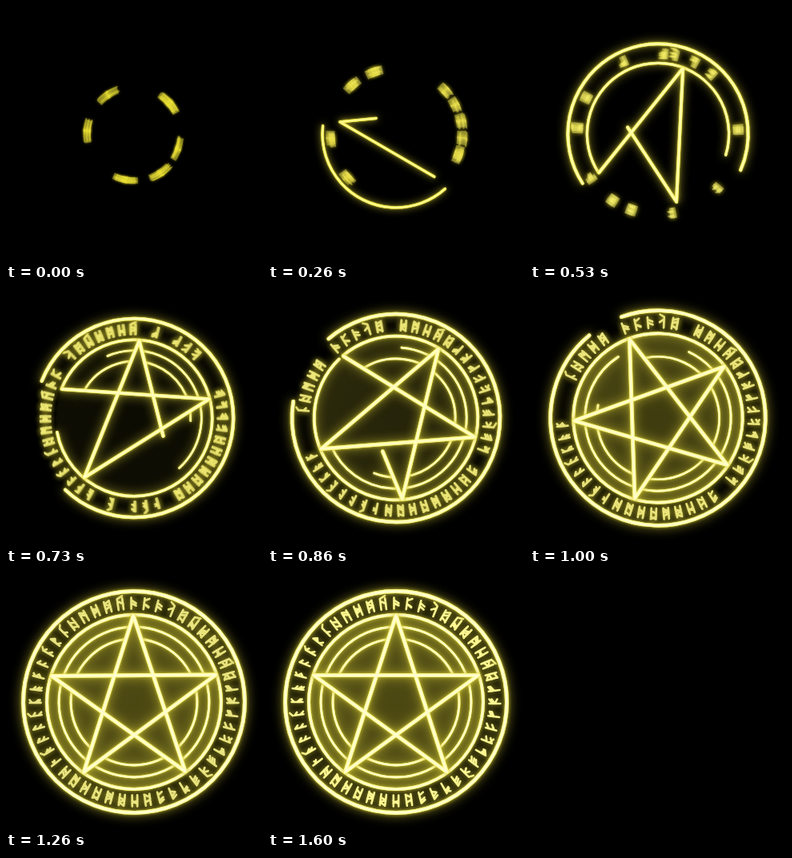
An HTML page with a canvas for the animation above (1.66 s loop, 320x320 px).

```html
<!DOCTYPE html>
<html>
<head>
<meta charset="utf-8">
<style>
html, body { margin: 0; width: 100%; height: 100%; overflow: hidden; background: #000; }
canvas { display: block; }
</style>
</head>
<body>
<canvas id="stage" width="320" height="320"></canvas>
<script>
const ctx = document.getElementById('stage').getContext('2d');
const LOOP = 1660, STEP = 1000 / 15, TAU = Math.PI * 2, RAD = Math.PI / 180;
const OUTER = 138.5, RING = 109, STAR = 108, RUNE = 123.5, SLOTS = 48;
const GLOW = '#cfc636';

// Rune slots that are lit (or dark) from a given step onward
const runeStages = [
  { from: 0, lit: [5, 13, 18, 24, 35, 42] },
  { from: 3, lit: [12, 17, 24, 27, 36, 38, 40, 42, 44] },
  { from: 6, lit: [0, 5, 8, 13, 17, 18, 20, 22, 28, 34, 39, 43, 45] },
  { from: 10, dark: [2, 10, 12, 16, 17, 18, 30, 34, 36] },
  { from: 13, dark: [5, 21, 39, 40, 41, 47] },
  { from: 17, dark: [] }
];

const clamp = v => Math.min(1, Math.max(0, v));
const easeOut = u => 1 - (1 - clamp(u)) ** 2;
const yellow = blue => `rgb(255,${Math.round(240 + blue / 16)},${Math.round(blue)})`;

function random(seed) {
  let s = seed * 7919 + 17;
  return () => (s = (s * 16807) % 2147483647) / 2147483647;
}

// A rune is one or two stems with a few slanted twigs
function makeRune(slot) {
  const rnd = random(slot + 1), path = new Path2D();
  for (let i = 0; i < 3; i++) rnd();
  const line = (x1, y1, x2, y2) => { path.moveTo(x1, y1); path.lineTo(x2, y2); };
  const pick = list => list[Math.floor(rnd() * list.length)];
  const double = rnd() < 0.4, stem = double ? -3.2 : pick([-2.5, 0, 2]);
  line(stem, -7, stem, 7);
  if (double) line(3.2, -7, 3.2, 7);
  for (let i = 0; i < 3; i++) {
    const y = pick([-7, -4, 0, 3]);
    line(stem, y, stem > 0 ? -3.5 : 3.5, y + pick([-3, 3, 4]));
  }
  return path;
}
const runes = Array.from({ length: SLOTS }, (_, i) => makeRune(i));

const polar = (r, a) => [r * Math.cos(a), r * Math.sin(a)];
const starPoint = i => polar(STAR, i * 144 * RAD);

// look: { scale, pale } with pale growing from 0 to 1
function glowStroke(path, width, look) {
  const pass = (color, w, blur) => {
    ctx.strokeStyle = color;
    ctx.lineWidth = w;
    ctx.shadowBlur = blur * look.scale;
    ctx.stroke(path);
  };
  ctx.shadowColor = GLOW;
  pass(yellow(30 + 90 * look.pale), width, 14);
  pass(yellow(40 + 100 * look.pale), width, 4);
  pass(yellow(110 + 95 * look.pale), width * 0.6, 0);
}

function arc(r, start, part, width, look) {
  if (part <= 0) return;
  const path = new Path2D();
  path.arc(0, 0, r, start, start + TAU * part);
  glowStroke(path, width, look);
}

function drawStar(part, look) {
  const path = new Path2D(), total = part * 5;
  path.moveTo(...starPoint(0));
  for (let i = 0; i < total; i++) {
    const [x1, y1] = starPoint(i), [x2, y2] = starPoint(i + 1);
    const k = Math.min(1, total - i);
    path.lineTo(x1 + (x2 - x1) * k, y1 + (y2 - y1) * k);
  }
  if (part >= 1) path.closePath();
  glowStroke(path, 4.9, look);
}

function drawInnerArcs(part, look) {
  if (part <= 0) return;
  ctx.save();
  const outside = new Path2D();
  outside.rect(-170, -170, 340, 340);
  // Star outline with its inner corners
  for (let i = 0; i < 10; i++) {
    const p = polar(i % 2 ? STAR * 0.382 : STAR, i * 36 * RAD);
    i ? outside.lineTo(...p) : outside.moveTo(...p);
  }
  outside.closePath();
  ctx.clip(outside, 'evenodd');
  arc(79, 0, part, 3, look);
  arc(94, 45 * RAD, part, 3, look);
  ctx.restore();
}

// Fast turning smears each rune; the copies gather towards its middle
function drawRunes(step, rest, look) {
  const stage = runeStages.filter(s => s.from <= step).pop();
  const smear = 28 * rest * rest, copies = 1 + Math.ceil(smear);
  ctx.save();
  ctx.strokeStyle = yellow(60 + 95 * look.pale);
  ctx.shadowColor = GLOW;
  ctx.shadowBlur = 8 * look.scale;
  ctx.lineWidth = 2.6 + rest;
  ctx.globalAlpha = Math.min(1, 0.35 + 0.65 / copies);
  for (let slot = 0; slot < SLOTS; slot++) {
    if (stage.lit ? !stage.lit.includes(slot) : stage.dark.includes(slot)) continue;
    for (let c = 0; c < copies; c++) {
      const u = copies > 1 ? 2 * c / (copies - 1) - 1 : 0;
      const shift = smear / 2 * u * Math.sqrt(Math.abs(u));
      ctx.save();
      ctx.rotate((slot * 360 / SLOTS + shift) * RAD + Math.PI / 2);
      ctx.translate(0, -RUNE);
      ctx.stroke(runes[slot]);
      ctx.restore();
    }
  }
  ctx.restore();
}

function drawFill(alpha) {
  if (alpha <= 0) return;
  const g = ctx.createRadialGradient(0, 0, 0, 0, 0, RING);
  g.addColorStop(0, '#4b4712');
  g.addColorStop(1, '#575318');
  ctx.save();
  ctx.globalAlpha = alpha;
  ctx.fillStyle = g;
  ctx.beginPath();
  ctx.arc(0, 0, RING, 0, TAU);
  ctx.fill();
  ctx.restore();
}

function draw(step) {
  const turn = easeOut((step + 0.3) / 20), rest = 1 - turn;
  const look = { scale: 1 - 0.545 * rest, pale: turn };
  ctx.setTransform(1, 0, 0, 1, 0, 0);
  ctx.fillStyle = '#000';
  ctx.fillRect(0, 0, 320, 320);
  ctx.translate(160, 160);
  ctx.scale(look.scale, look.scale);
  ctx.rotate((270 - 360 * rest) * RAD);
  ctx.lineCap = 'round';
  ctx.lineJoin = 'round';

  drawFill(clamp((step - 10) / 6));
  drawRunes(step, rest, look);
  if (step > 0) {
    arc(OUTER, 0, turn, 4.8, look);
    arc(RING, 0, easeOut((step - 4) / 10), 4, look);
    drawInnerArcs(easeOut((step - 8) / 11.7), look);
    drawStar(clamp(step / 15), look);
  }
}

let shown = -1;
function tick() {
  const step = Math.min(24, Math.floor((performance.now() % LOOP + 6.7) / STEP));
  if (step !== shown) draw(shown = step);
  requestAnimationFrame(tick);
}
tick();
</script>
</body>
</html>
```
